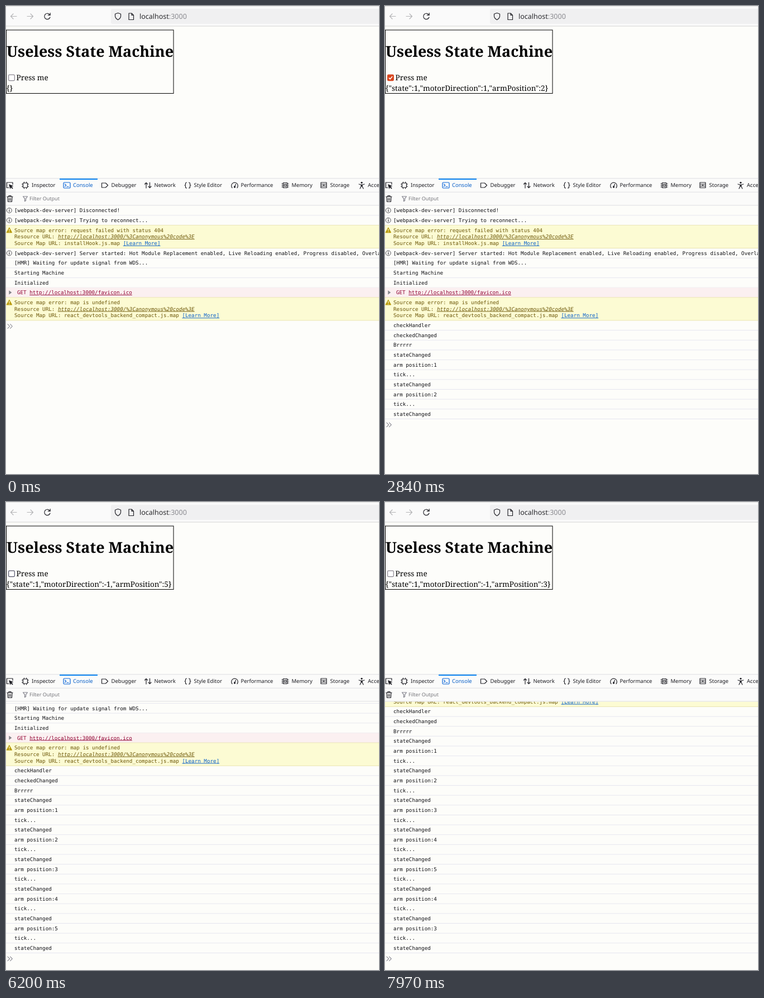
Recreate the animation shown at these times as an HTML page. Size 668 px wide and 838 px high, loop 8 s.

```html
<!DOCTYPE html>
<html lang="en">
<head>
<meta charset="utf-8">
<title>Useless State Machine</title>
<style>
html, body { margin: 0; width: 100%; height: 100%; overflow: hidden; background: #fdfdfa; }
svg { display: block; width: 668px; height: 838px; text-rendering: geometricPrecision; }
.ui { font-family: "Noto Sans", "Open Sans", sans-serif; }
.tab { font-size: 9.5px; fill: #1c1c22; }
.page { font-family: "Noto Serif", serif; font-size: 13.44px; fill: #000; }
.log { font-family: "DejaVu Sans Mono", monospace; font-size: 11px; fill: #111116; }
.warn { fill: #6d5708; }
.err { fill: #900030; }
.url { text-decoration: underline; }
.src { font-style: italic; }
.more { fill: #0a60c8; text-decoration: underline; }
.ico { fill: none; stroke: #222228; stroke-width: 1.2; stroke-linecap: round; stroke-linejoin: round; }
.on { stroke: #0a66d8; }
.dim { stroke: #b4b4b6; }
.grey { stroke: #80808a; }
.solid { fill: #222228; stroke: none; }
</style>
</head>
<body>
<svg viewBox="0 0 668 838" xmlns="http://www.w3.org/2000/svg">
  <defs><clipPath id="view"><rect y="357.2" width="668" height="481"/></clipPath></defs>
  <rect width="668" height="838" fill="#fdfdfa"/>

  <!-- browser bar -->
  <rect width="668" height="36" fill="#fafafa"/>
  <path d="M0 .5H668" stroke="#e4e4e2"/>
  <path d="M0 36H668" stroke="#d2d2d2"/>
  <path d="M668 5H191a3 3 0 0 0-3 3V29a3 3 0 0 0 3 3H668z" fill="#f0f0f1"/>
  <path class="ico dim" d="M19 18.5H8.5M13 14l-4.5 4.5L13 23M38 18.5H48.5M44 14l4.5 4.5L44 23"/>
  <path class="ico" d="M78.6 16a5.2 5.2 0 1 0 .4 4M79.2 12.6v3.8h-3.8"/>
  <path class="ico" d="M200.5 12.5l5 1.8v3.7q0 4-5 6.7q-5-2.7-5-6.7v-3.7z"/>
  <path class="ico" d="M220 13h5l3.5 3.5v8h-8.5zM225 13v3.5h3.5"/>
  <text class="ui" x="239" y="22.6" font-size="12.5" fill="#2a2a2e">localhost<tspan fill="#8b8b90">:3000</tspan></text>

  <!-- page -->
  <rect x=".5" y="43" width="299.5" height="113.5" fill="none" stroke="#000"/>
  <g class="page">
    <text x="1" y="90.7" font-size="26.88" font-weight="700">Useless State Machine</text>
    <text x="18.6" y="133">Press me</text>
    <text id="state" x=".8" y="151.6"></text>
  </g>
  <rect id="box" x="4.7" y="123.2" width="10.6" height="10.4" rx="1.6" stroke-width="1.2"/>
  <path id="tick" d="M7 128.6l2.2 2.2L13.2 126" fill="none" stroke="#fff" stroke-width="1.5"/>

  <!-- console -->
  <g clip-path="url(#view)"><g id="log" class="log"></g></g>

  <!-- tool bar -->
  <rect y="308.5" width="668" height="48.7" fill="#fbfbfa"/>
  <path d="M0 308.7H668M0 333.2H668M0 356.9H668" stroke="#dfdfe2"/>
  <path d="M96 310H164" stroke="#0a84f0" stroke-width="1.8"/>
  <path class="ico" d="M5 325.5H1.5V316H12v3.5"/>
  <path class="solid" d="M5 319l8.5 3.2-3.4 1.4 2.6 2.6-1.3 1.3-2.6-2.6-1.3 3z"/>
  <path class="ico" d="M30.5 317h8v8h-8zM32.5 315v2M36.5 315v2M32.5 325v2M36.5 325v2M28.5 319h2M28.5 323h2M38.5 319h2M38.5 323h2"/>
  <path class="ico on" d="M104.5 316h9a1.5 1.5 0 0 1 1.5 1.5v7a1.5 1.5 0 0 1-1.5 1.5h-9a1.5 1.5 0 0 1-1.5-1.5v-7a1.5 1.5 0 0 1 1.5-1.5zM105.5 318.8l2.2 2.2-2.2 2.2M109 323.5h3"/>
  <path class="ico" d="M171.5 317h7l4 4-4 4h-7z"/>
  <path class="ico" d="M251 326v-9.5M248.5 319l2.5-2.7 2.5 2.7M257.5 316v9.5M255 323l2.5 2.7 2.5-2.7"/>
  <path class="ico" d="M323.5 316q-2 0-2 2v1.5q0 1.5-1.5 1.5q1.5 0 1.5 1.5v1.5q0 2 2 2M327.5 316q2 0 2 2v1.5q0 1.5 1.5 1.5q-1.5 0-1.5 1.5v1.5q0 2-2 2"/>
  <path class="ico" d="M405 325.5a5.8 5.8 0 1 1 9 0M409.5 323.5l2-4.5"/>
  <circle class="solid" cx="409.5" cy="324" r="1.7"/>
  <path class="ico" d="M496.5 316.5h7v9h-7zM498.5 319h3v4h-3zM494 318h2.5M494 321h2.5M494 324h2.5M503.5 318h2.5M503.5 321h2.5M503.5 324h2.5"/>
  <path class="ico" d="M564 316h10v3h-10zM564 319h10v3.5h-10zM564 322.5h10v3h-10zM568 320.8h2"/>
  <circle class="solid" cx="637" cy="316.3" r="1.6"/>
  <path class="ico" d="M632 319l3.5 1h3l3.5-1M636 320v3l-2 4M638 320v3l2 4M637 320v3"/>
  <g id="tabs" class="ui tab"></g>
  <path class="ico" d="M2 341.5h10M5 341.5v-1.8h4v1.8M3 342l.6 8.5h6.8l.6-8.5M5.7 344v4.5M8.3 344v4.5"/>
  <path class="ico grey" d="M30.5 341h8l-3 3.8v3.7l-2 1.2v-4.9z"/>
  <text class="ui" x="42" y="347.6" font-size="9" fill="#77777c">Filter Output</text>
</svg>
<script>
const LOOP = 8000, SCALE = 0.84, TOP = 357.2, LIMIT = 807.4, ROW = 21, WARN = 49;
const $ = id => document.getElementById(id);

$('tabs').innerHTML = [
  [46, 'Inspector'], [120, 'Console'], [188.5, 'Debugger'], [265.5, 'Network'], [336.5, 'Style Editor'],
  [420.5, 'Performance'], [511.5, 'Memory'], [580.5, 'Storage'], [648, 'Accessibility']
].map(([x, s]) => `<text x="${x}" y="324.3"${s === 'Console' ? ' fill="#0a60c8"' : ''}>${s}</text>`).join('');

// Console rows are laid out in unscaled pixels.
const line = (s, y = 14.4) => `<text x="17.9" y="${y}">${s}</text>`;
const rule = (h, c = '#e3e3ee') => `<path d="M0 ${h}H800" stroke="${c}"/>`;
const infoIcon = '<circle cx="7" cy="10.5" r="5.3" fill="none" stroke="#33333a"/>' +
  '<path d="M7 9.5v4M7 7v1.4" stroke="#33333a" stroke-width="1.5"/>';
const warnIcon = '<path d="M7 5.5l5.3 10H1.7z" fill="#b89a08" stroke="#b89a08" stroke-width="1.5" stroke-linejoin="round"/>' +
  '<path d="M7 8v4M7 13.3v1.5" stroke="#fff" stroke-width="1.4"/>';

const plain = s => ({ h: ROW, svg: line(s) + rule(ROW) });
const info = s => ({ h: ROW, svg: infoIcon + line(s) + rule(ROW) });
const warn = (msg, map) => ({
  h: WARN,
  svg: `<rect width="800" height="${WARN}" fill="#fcfbd3"/>${rule(0, '#ebe6b4')}${rule(WARN, '#e6dfa6')}${warnIcon}` +
    `<g class="warn">${line('Source map error: ' + msg)}` +
    line('Resource URL: <tspan class="url src">http://localhost:3000/%3Canonymous%20code%3E</tspan>', 28.4) +
    line(`Source Map URL: ${map} <tspan class="more">[Learn More]</tspan>`, 42.4) + '</g>'
});
const failed = url => ({
  h: ROW,
  svg: `<rect width="800" height="${ROW}" fill="#fbf0f1"/>${rule(ROW, '#f0dce2')}` +
    '<path d="M6.3 6l6 4.5-6 4.5z" fill="#85858a"/>' +
    `<text class="err" x="23.8" y="14.4">GET <tspan class="url">${url}</tspan></text>`
});

const rows = [
  info('[webpack-dev-server] Disconnected!'),
  info('[webpack-dev-server] Trying to reconnect...'),
  warn('request failed with status 404', 'installHook.js.map'),
  info('[webpack-dev-server] Server started: Hot Module Replacement enabled, Live Reloading enabled, Progress disabled, Overlay enabled.'),
  plain('[HMR] Waiting for update signal from WDS...'),
  plain('Starting Machine'),
  plain('Initialized'),
  failed('http://localhost:3000/favicon.ico'),
  warn('map is undefined', 'react_devtools_backend_compact.js.map')
];
const base = rows.length;
rows.push(...['checkHandler', 'checkedChanged', 'Brrrrr', 'stateChanged'].map(plain));
for (const arm of [1, 2, 3, 4, 5, 4, 3])
  rows.push(...['arm position:' + arm, 'tick...', 'stateChanged'].map(plain));

let y = 0;
const ends = [];
$('log').innerHTML = rows.map(r => {
  const g = `<g transform="translate(0 ${y})">${r.svg}</g>`;
  ends.push(y += r.h);
  return g;
}).join('') + '<path id="prompt" class="ico grey" d="M3.5 8l4.5 4.5-4.5 4.5M9 8l4.5 4.5-4.5 4.5"/>';
const nodes = [...$('log').children].slice(0, rows.length);

// [time, value] steps; the last one reached holds.
const logSteps = [[0, 0], [1730, 4], [1800, 7], [2770, 10], [3850, 13], [4850, 16], [5850, 19], [6860, 22], [7880, 25]];
const armSteps = [[0, 0], [1560, 1], [2690, 2], [3760, 3], [4780, 4], [5760, 5], [6770, 4], [7790, 3]];
const boxSteps = [[0, 'idle'], [1050, 'hover'], [1470, 'press'], [1560, 'dark'], [2070, 'checked'], [5760, 'hover'], [7480, 'idle']];
const looks = {
  idle: ['#fff', '#8a8690'], hover: ['#fff', '#55556a'], press: ['#dcdce0', '#44444e'],
  dark: ['#b3330f', '#b3330f'], checked: ['#d9451e', '#d9451e']
};
const at = (steps, t) => steps.reduce((v, s) => t >= s[0] ? s[1] : v, steps[0][1]);

function draw(t) {
  const arm = at(armSteps, t), look = at(boxSteps, t), shown = base + at(logSteps, t);
  $('state').textContent = arm
    ? JSON.stringify({ state: 1, motorDirection: t < 5760 ? 1 : -1, armPosition: arm }) : '{}';
  $('box').setAttribute('fill', looks[look][0]);
  $('box').setAttribute('stroke', looks[look][1]);
  $('tick').style.display = look === 'dark' || look === 'checked' ? '' : 'none';

  const end = ends[shown - 1];
  const scroll = Math.max(0, TOP + end * SCALE - LIMIT);
  nodes.forEach((n, i) => n.style.display = i < shown ? '' : 'none');
  $('prompt').setAttribute('transform', `translate(0 ${end})`);
  $('log').setAttribute('transform', `translate(0 ${TOP - scroll}) scale(${SCALE})`);
}

const start = performance.now();
function frame(now) {
  draw(Math.max(0, now - start) % LOOP);
  requestAnimationFrame(frame);
}
draw(0);
requestAnimationFrame(frame);
</script>
</body>
</html>
```
